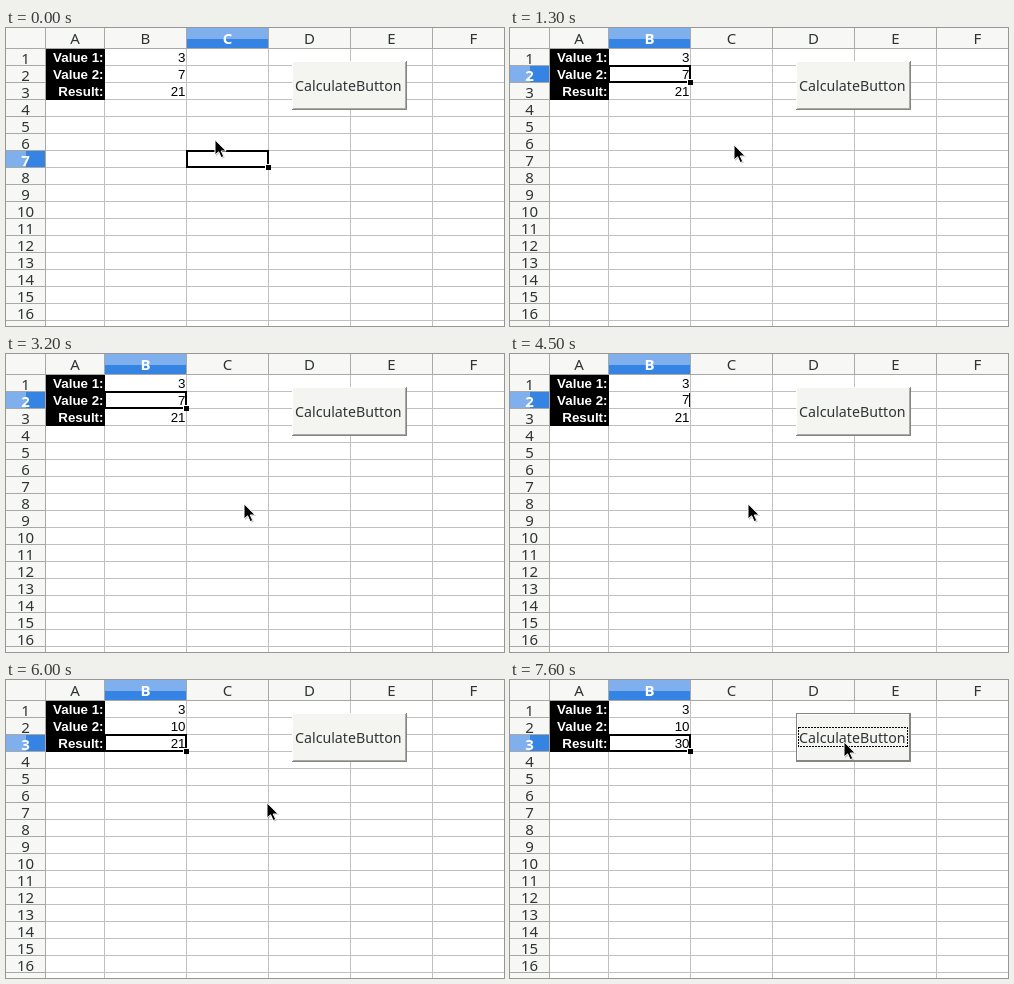
An HTML page for the animation above (8000 ms loop, 498 px wide and 298 px high).

```html
<!DOCTYPE html>
<html lang="en">
<head>
<meta charset="utf-8">
<title>Spreadsheet button</title>
<style>
  html, body { margin: 0; width: 100%; height: 100%; overflow: hidden; background: #fff; }
  svg { display: block; width: 498px; height: 298px; }
  text { white-space: pre; }
  .head { font: 15px "Noto Sans", "Open Sans", sans-serif; fill: #2e3436; text-anchor: middle; }
  .head.on { font-weight: 700; fill: #fff; }
  .cell { font: 13.333px "Liberation Sans", Arial, sans-serif; text-anchor: end; }
  .label { font-weight: 700; fill: #fff; }
  .button { font: 14.2px "Noto Sans", "Open Sans", sans-serif; fill: #2e3436; text-anchor: middle; }
  .crisp { shape-rendering: crispEdges; fill: none; }
</style>
</head>
<body>
<svg id="stage" viewBox="0 0 498 298"></svg>
<script>
const DURATION = 8000, STEP = 100;
const EDIT = 4500, TYPE = 5200, ENTER = 5900, PRESS = 7600;
const LIGHT = '#7fb0ed', DARK = '#3584e4', HEAD = '#f7f7f5', HEAD_LINE = '#a8a9a5';
const stage = document.getElementById('stage');
const columnX = i => i ? 16 + 82 * i : 39;
const rowY = row => 3 + 17 * row;

// pointer moves: first step, last step, x, y
const home = { x: 208, y: 111 };
const moves = [
  [400, 700, 169, 42],
  [1300, 1400, 241, 141],
  [1600, 2000, 242, 136],
  [2700, 3200, 237, 149],
  [6000, 6200, 279, 101],
  [6400, 6600, 297, 79],
  [6700, 7000, 333, 61]
];

function set(node, attrs) {
  for (const key in attrs) node.setAttribute(key, attrs[key]);
}
function add(name, attrs, parent = stage) {
  const node = document.createElementNS('http://www.w3.org/2000/svg', name);
  set(node, attrs);
  return parent.appendChild(node);
}
function rect(x, y, width, height, fill, parent) {
  return add('rect', { x, y, width, height, fill, 'shape-rendering': 'crispEdges' }, parent);
}
function text(content, x, y, style) {
  const node = add('text', { x, y, class: style });
  node.textContent = content;
  return node;
}
function show(node, visible) {
  node.style.display = visible ? '' : 'none';
}

// grid and headers
rect(0, 0, 498, 20, HEAD);
rect(0, 0, 39, 298, HEAD);
for (let i = 0; i < 6; i++) {
  rect(columnX(i), 0, 1, 20, HEAD_LINE);
  rect(columnX(i), 20, 1, 278, '#c0c0c0');
}
for (let row = 1; row <= 17; row++) {
  rect(0, rowY(row), 39, 1, HEAD_LINE);
  rect(39, rowY(row), 459, 1, '#c0c0c0');
}
rect(0, 20, 498, 1, HEAD_LINE);
rect(39, 0, 1, 298, HEAD_LINE);

const columnLight = rect(0, 0, 1, 11, LIGHT);
const columnDark = rect(0, 11, 1, 9, DARK);
const rowMark = add('g', {});
rect(0, 1, 20, 16, LIGHT, rowMark);
rect(20, 1, 19, 16, DARK, rowMark);

const columnHeads = [...'ABCDEF'].map((name, i) =>
  text(name, (columnX(i) + columnX(i + 1) + 1) / 2, 16, 'head'));
const rowHeads = Array.from({ length: 17 }, (_, i) =>
  text(i + 1, 19.5, rowY(i + 1) + 16, 'head'));

// cells
rect(40, 21, 59, 51, '#000');
['Value 1:', 'Value 2:', 'Result:'].forEach((label, i) =>
  text(label, 97.5, rowY(i + 1) + 14, 'cell label'));
const values = ['3', '7', '21'].map((value, i) =>
  text(value, 179.5, rowY(i + 1) + 14, 'cell'));
const caret = rect(179, 39, 1, 14, '#000');

const frame = add('g', {});
const border = add('rect', { class: 'crisp', height: 16, stroke: '#000', 'stroke-width': 2 }, frame);
const handle = add('g', {}, frame);
rect(-1, -1, 6, 6, '#fff', handle);
rect(0, 0, 5, 5, '#000', handle);

// button
rect(286, 33, 115, 49, '#f4f4f1');
add('path', { class: 'crisp', d: 'M286.5 81V33.5H400', stroke: '#fff' });
add('path', { class: 'crisp', d: 'M399.5 34V80.5H287', stroke: '#a8a8a4' });
add('path', { class: 'crisp', d: 'M400.5 33V81.5H286', stroke: '#858582' });
const focus = add('g', { class: 'crisp' });
add('rect', { x: 286.5, y: 33.5, width: 113, height: 47, stroke: '#858582' }, focus);
add('path', { d: 'M287.5 79V34.5H398', stroke: '#fff' }, focus);
add('rect', { x: 288.5, y: 47.5, width: 109, height: 19, stroke: '#000', 'stroke-dasharray': '2 1' }, focus);
text('CalculateButton', 342.3, 63, 'button');

// pointer with a soft shadow
const pointer = add('g', {});
const arrow = 'M1 .8V16L4.6 12.8L7.2 18.6L9.8 17.5L7.2 12H12.2Z';
add('path', { d: arrow, transform: 'translate(1 1)', opacity: .25 }, pointer);
add('path', { d: arrow, stroke: '#fff', 'stroke-linejoin': 'round' }, pointer);

function pointerAt(time) {
  let { x, y } = home;
  for (const [first, last, toX, toY] of moves) {
    if (time < first) break;
    const steps = (last - first) / STEP + 1;
    const done = Math.min(1, (Math.floor((time - first) / STEP) + 1) / steps);
    const eased = 1 - (1 - done) ** 2;
    x += (toX - x) * eased;
    y += (toY - y) * eased;
  }
  return `translate(${Math.round(x)} ${Math.round(y)})`;
}

function select(column, row) {
  const x = columnX(column), y = rowY(row), width = columnX(column + 1) - x;
  for (const mark of [columnLight, columnDark]) set(mark, { x: x + 1, width: width - 1 });
  set(rowMark, { transform: `translate(0 ${y})` });
  set(border, { x: x + 1, y: y + 1, width: width - 1 });
  set(handle, { transform: `translate(${x + width - 2} ${y + 15})` });
  columnHeads.forEach((head, i) => head.classList.toggle('on', i === column));
  rowHeads.forEach((head, i) => head.classList.toggle('on', i === row - 1));
}

function render(time) {
  if (time < 900) select(2, 7);
  else select(1, time < ENTER ? 2 : 3);

  const editing = time >= EDIT && time < ENTER;
  const pressed = time >= PRESS;
  show(frame, !editing);
  show(caret, editing);
  show(focus, pressed);

  values[1].textContent = time < TYPE ? '7' : '10'.slice(0, Math.floor((time - TYPE) / STEP));
  set(values[1], { y: rowY(2) + (editing ? 13 : 14) });
  values[2].textContent = pressed ? '30' : '21';
  set(pointer, { transform: pointerAt(time) });
}

const start = performance.now();
function tick() {
  render((performance.now() - start) % DURATION);
  requestAnimationFrame(tick);
}
tick();
</script>
</body>
</html>
```
